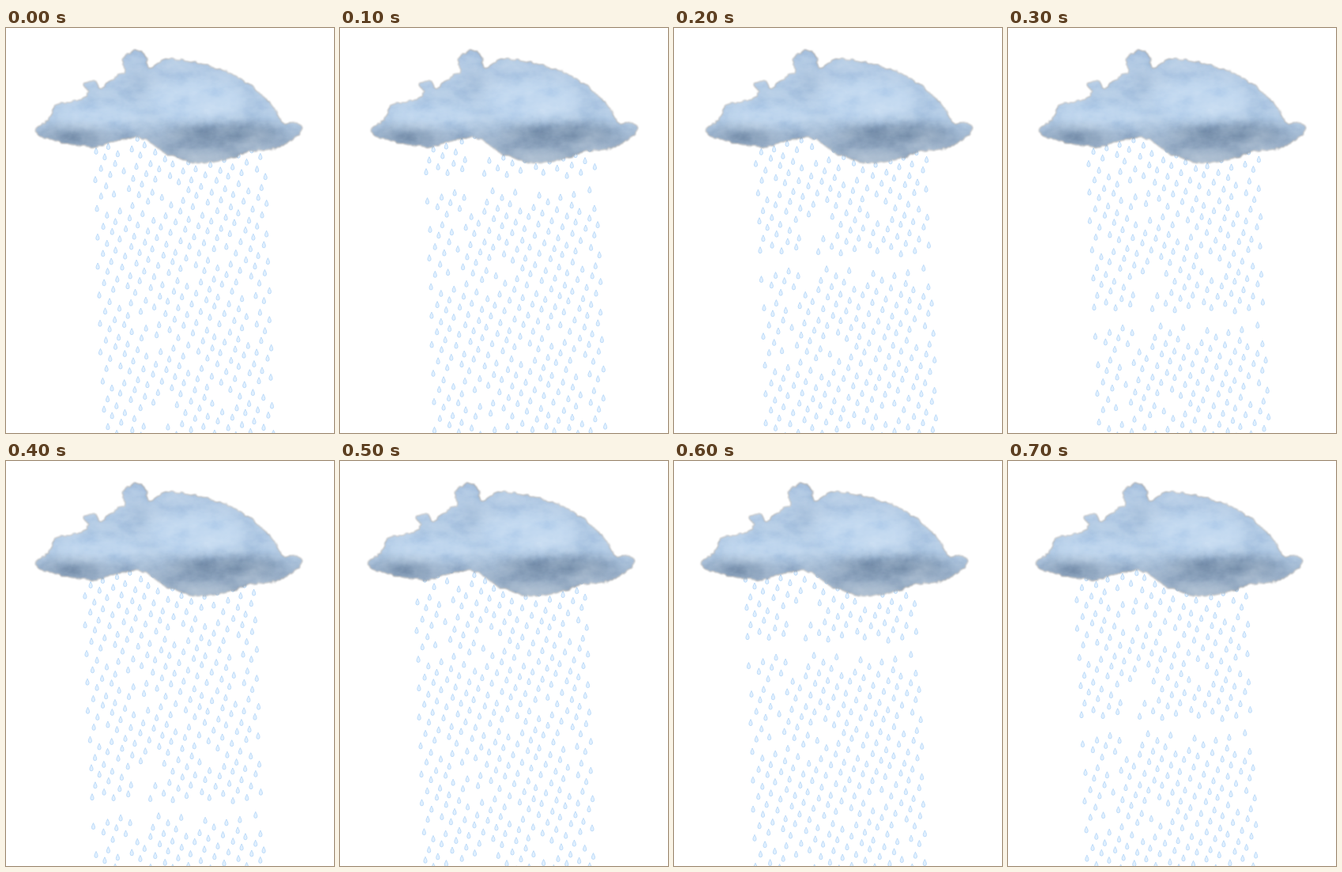
An HTML page that plays this animation: 415x512 px, repeating every 0.8 s.

```html
<!DOCTYPE html>
<html lang="en">
<head>
<meta charset="utf-8">
<title>Rain cloud</title>
<style>
html, body { margin: 0; width: 100%; height: 100%; overflow: hidden; background: #fff; }
svg { display: block; width: 100vw; height: 100vh; }
</style>
</head>
<body>
<svg viewBox="0 0 415 512">
  <defs>
    <path id="drop" d="M0-4.2C.7-2.4 2.1-.6 2.1 1.5A2.1 2.3 0 1 1-2.1 1.5C-2.1-.6-.7-2.4 0-4.2Z"
      fill="#e0f0ff" stroke="#b0d3f7" stroke-width=".8"/>
    <linearGradient id="sky" x1="0" y1="28" x2="0" y2="172" gradientUnits="userSpaceOnUse">
      <stop offset="0" stop-color="#b3cae4"/>
      <stop offset=".6" stop-color="#b5cde6"/>
      <stop offset=".8" stop-color="#9bb1ca"/>
      <stop offset="1" stop-color="#a6b8cb"/>
    </linearGradient>
    <clipPath id="below"><rect y="128" width="415" height="384"/></clipPath>
    <clipPath id="inside"><path id="edge"/></clipPath>
    <filter id="soft" x="-20%" y="-40%" width="140%" height="180%"><feGaussianBlur stdDeviation="8"/></filter>
    <filter id="fluff" x="25" y="15" width="360" height="170" filterUnits="userSpaceOnUse" color-interpolation-filters="sRGB">
      <feTurbulence type="fractalNoise" baseFrequency=".03 .045" numOctaves="4" seed="8"/>
      <feColorMatrix values=".5 0 0 0 .25  .5 0 0 0 .25  .5 0 0 0 .25  0 0 0 0 1" result="gray"/>
      <feTurbulence type="fractalNoise" baseFrequency=".13" numOctaves="2" seed="3" result="fine"/>
      <feDisplacementMap in="SourceGraphic" in2="fine" scale="6" xChannelSelector="R" yChannelSelector="G"/>
      <feGaussianBlur stdDeviation=".8" result="body"/>
      <feBlend in="gray" in2="body" mode="soft-light"/>
      <feComposite in2="body" operator="in"/>
    </filter>
  </defs>
  <rect width="415" height="512" fill="#fff"/>
  <g id="rain" clip-path="url(#below)"></g>
  <g id="cloud"><g filter="url(#fluff)"><g clip-path="url(#inside)">
    <rect x="25" y="15" width="360" height="170" fill="url(#sky)"/>
    <g filter="url(#soft)">
      <g fill="#c0d7ef">
        <ellipse cx="240" cy="92" rx="62" ry="28"/>
        <ellipse cx="120" cy="109" rx="60" ry="11"/>
      </g>
      <g fill="#7088a3" opacity=".75">
        <ellipse cx="84" cy="136" rx="38" ry="7"/>
        <ellipse cx="275" cy="133" rx="72" ry="11"/>
      </g>
      <ellipse cx="168" cy="66" rx="12" ry="16" fill="#9fb9d6" opacity=".6"/>
    </g>
  </g></g></g>
</svg>
<script>
const NS = 'http://www.w3.org/2000/svg';
const $ = id => document.getElementById(id);

function add(parent, tag, attrs = {}) {
  const el = document.createElementNS(NS, tag);
  for (const k in attrs) el.setAttribute(k, attrs[k]);
  return parent.appendChild(el);
}

function seeded(s) {
  return () => (s = (s * 16807) % 2147483647) / 2147483647;
}

// Key points of the silhouette, clockwise from the left tip
const rim = [
  [37, 131], [54, 115], [63, 98], [95, 90], [104, 81], [98, 71], [112, 66], [120, 77],
  [132, 65], [149, 56], [149, 38], [165, 28], [177, 37], [182, 50], [208, 39], [262, 49],
  [300, 66], [333, 94], [352, 121], [366, 119], [373, 131], [345, 151], [310, 156],
  [285, 165], [245, 171], [210, 162], [190, 151], [172, 139], [140, 142], [115, 150],
  [97, 149], [60, 143]
];

// Closed Catmull-Rom curve through all points
function curve(points) {
  const at = i => points[(i + points.length) % points.length];
  const lean = (a, b, c, sign) => a.map((v, k) => v + sign * (c[k] - b[k]) / 6);
  return points.reduce((d, p, i) => {
    const q = at(i + 1);
    return d + `C${lean(p, at(i - 1), q, 1)} ${lean(q, p, at(i + 2), -1)} ${q}`;
  }, 'M' + points[0]) + 'Z';
}
$('edge').setAttribute('d', curve(rim));

// One sheet of rain: tilted columns, each shifted by the golden ratio
function makeSheet(parent) {
  const rnd = seeded(4127), top = 105, bottom = 524, gap = 36.3;
  for (let c = 0; c < 38; c++) {
    const phase = (155 - top - c * gap * .382) % gap + gap;
    for (let y = top + phase % gap; y < bottom; y += gap) {
      const x = 113 + 5.8 * c + .03 * (y - 155) + (rnd() - .5) * 3;
      const dy = (rnd() - .5) * 3;
      if (rnd() > .08) add(parent, 'use', { href: '#drop', x: x.toFixed(1), y: (y + dy).toFixed(1) });
    }
  }
}

const sheets = [0, 1, 2].map(() => {
  const g = add($('rain'), 'g');
  makeSheet(g);
  return g;
});

const STEP = 100, STEPS = 8, SHEET = 436;
const depths = [0, 198, 342, 575, 773]; // one key every two steps

function fall(n) {
  const i = Math.floor(n / 2);
  return depths[i] + (depths[i + 1] - depths[i]) * (n / 2 - i);
}

function move(el, x, y) {
  el.setAttribute('transform', `translate(${x} ${y})`);
}

let shown = -1;
function draw(now) {
  const n = Math.floor(now / STEP) % STEPS;
  if (n === shown) return;
  shown = n;
  move($('cloud'), Math.round(3 * Math.sin(n / STEPS * 2 * Math.PI)), 0);
  sheets.forEach((g, i) => move(g, -16 * i, fall(n) - SHEET * i));
}

function loop(now) {
  draw(now);
  requestAnimationFrame(loop);
}
draw(0);
requestAnimationFrame(loop);
</script>
</body>
</html>
```
